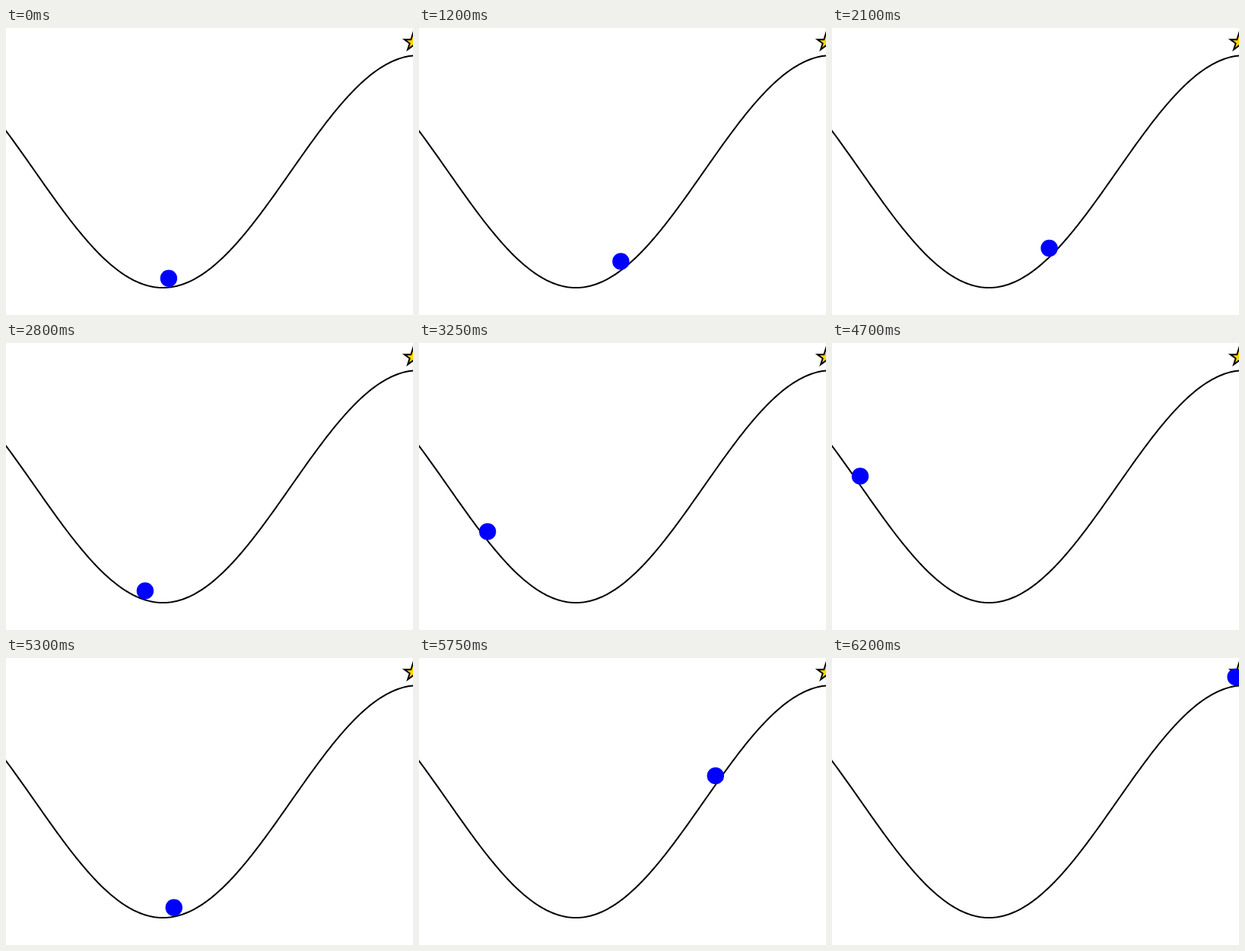
Animation of 535x378 px, one loop 6250 ms. Source, as an HTML page:

```html
<!DOCTYPE html>
<html lang="en">
<head>
<meta charset="utf-8">
<title>Mountain car</title>
<style>
  html, body { margin: 0; width: 100%; height: 100%; overflow: hidden; background: #fff; }
  svg { display: block; width: 535px; height: 378px; }
</style>
</head>
<body>
<svg viewBox="0 0 535 378">
  <path id="hill" fill="none" stroke="#000" stroke-width="2" stroke-linejoin="round"/>
  <polygon id="goal" fill="#ffd700" stroke="#000" stroke-width="2" stroke-miterlimit="10"/>
  <circle id="car" r="11.2" fill="#00f"/>
</svg>
<script>
const LOOP = 6250, STEP = 50, LAST = 123;
const VALLEY = { x: 206.3, y: 342 };
const SCALE = 321, AMPLITUDE = 153, CAR_LIFT = 11.9;

const byId = id => document.getElementById(id);
const toPixel = pos => VALLEY.x + (pos + Math.PI / 6) * SCALE;
const hillY = px => VALLEY.y - AMPLITUDE * (1 - Math.cos(3 * (px - VALLEY.x) / SCALE));

// Mountain-car dynamics: always push in the direction of travel.
function drive() {
  const track = [-0.5];
  let pos = -0.5, vel = 0;
  for (let k = 1; k <= LAST; k++) {
    const push = vel < 0 ? -1 : 1;
    vel += 0.001 * push - 0.0025 * Math.cos(3 * pos);
    pos += vel;
    track.push(pos);
  }
  return track;
}

function starPoints(cx, cy, radius) {
  return Array.from({ length: 10 }, (_, i) => {
    const r = i % 2 ? radius * 0.382 : radius;
    const angle = (i / 5 - 0.5) * Math.PI;
    return `${cx + r * Math.cos(angle)},${cy + r * Math.sin(angle)}`;
  }).join(" ");
}

function hillPath() {
  const points = [];
  for (let x = -5; x <= 540; x += 2.5) points.push(`${x},${hillY(x).toFixed(3)}`);
  return "M" + points.join("L");
}

byId("hill").setAttribute("d", hillPath());
byId("goal").setAttribute("points", starPoints(toPixel(0.5), 18.9, 11.6));

const track = drive();
const car = byId("car");

function draw(time) {
  const step = Math.floor((time % LOOP) / STEP) - 1;
  const x = toPixel(track[Math.min(LAST, Math.max(0, step))]);
  car.setAttribute("cx", x);
  car.setAttribute("cy", hillY(x) - CAR_LIFT);
}

const start = performance.now();
function tick() {
  draw(performance.now() - start);
  requestAnimationFrame(tick);
}
tick();
</script>
</body>
</html>
```
